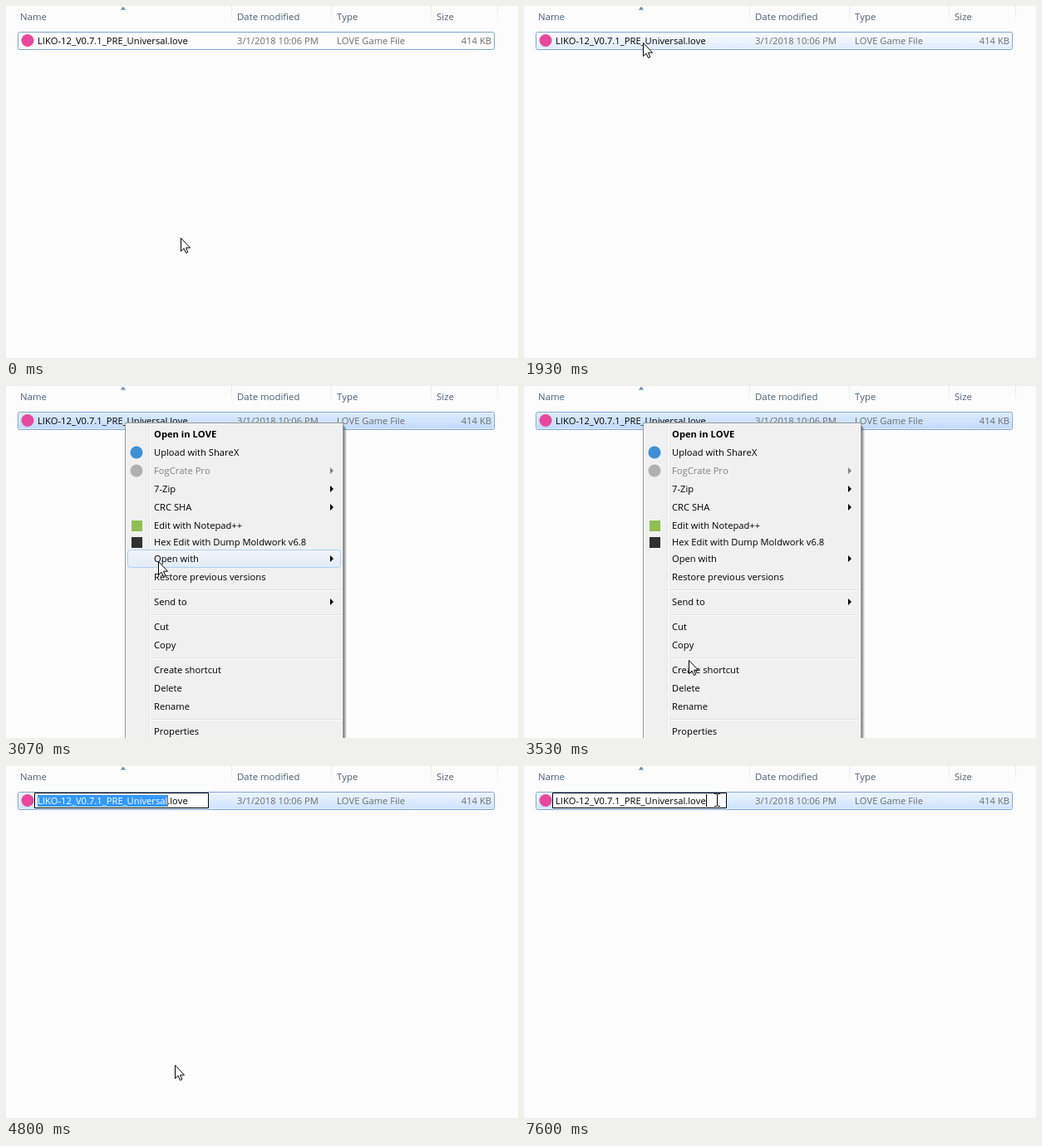
Animation of 616 by 424 pixels, one loop 8000 ms. Source, as an HTML page with a canvas:

```html
<!DOCTYPE html>
<html lang="en">
<head>
<meta charset="utf-8">
<title>Renaming a file</title>
<style>
html, body { margin: 0; width: 100%; height: 100%; overflow: hidden; background: #fcfcfc; }
canvas { display: block; }
</style>
</head>
<body>
<canvas id="stage" width="616" height="424"></canvas>
<script>
const ctx = document.getElementById('stage').getContext('2d');
const LOOP = 8000, FPS = 15;
const FILE = 'LIKO-12_V0.7.1_PRE_Universal.love';
const BG = '#fcfcfc', GREY = '#6d6d6d', HEAD = '#4c607a';

// Steps at which the interface changes state
const HOVER = 25, SELECT = 30, MENU = 37, CLOSE = 67, EDIT = 69, CLICK = 98;
const BLINK = 8;

const linear = u => u;
const smooth = u => u * u * (3 - 2 * u);
const easeIn = u => u ** 1.6;
const easeOut = u => 1 - (1 - u) ** 1.7;

// Pointer path: step, x, y, easing used to get there
const path = [
  [7, 210, 279], [14, 176, 167, smooth], [17, 176, 167, linear],
  [26, 143, 45, smooth], [27, 143, 45, linear], [28, 143, 44, linear],
  [39, 143, 44, linear], [46, 183, 211, easeIn], [49, 193, 280, linear],
  [62, 203, 388, easeOut], [66, 203, 388, linear], [72, 203, 360, easeIn],
  [79, 193, 185, linear], [89, 220, 42, easeOut], [90, 220, 42, linear],
  [93, 219, 42, linear], [94, 222, 41, linear], [104, 222, 41, linear],
  [106, 232, 41, linear]
];

// Menu rows: label, centre y, options
const menu = [
  ['Open in LOVE', 58, { bold: true }],
  ['Upload with ShareX', 80, { dot: '#3d8fd6' }],
  ['FogCrate Pro', 102, { dot: '#b0b0b0', off: true, sub: true }],
  ['7-Zip', 124, { sub: true }],
  ['CRC SHA', 146, { sub: true }],
  ['Edit with Notepad++', 168, { box: '#8fbf52' }],
  ['Hex Edit with Dump Moldwork v6.8', 188, { box: '#303030' }],
  ['Open with', 208, { sub: true }],
  ['Restore previous versions', 230, {}],
  ['Send to', 260, { sub: true }],
  ['Cut', 290, {}],
  ['Copy', 312, {}],
  ['Create shortcut', 342, {}],
  ['Delete', 364, {}],
  ['Rename', 386, {}],
  ['Properties', 416, {}]
];

function pointerAt(step) {
  let a = path[0];
  if (step <= a[0]) return { x: a[1], y: a[2] };
  for (const b of path) {
    if (step <= b[0]) {
      const u = b[3]((step - a[0]) / (b[0] - a[0]));
      return {
        x: Math.round(a[1] + (b[1] - a[1]) * u),
        y: Math.round(a[2] + (b[2] - a[2]) * u)
      };
    }
    a = b;
  }
  return { x: a[1], y: a[2] };
}

function rect(x, y, w, h, fill) {
  ctx.fillStyle = fill;
  ctx.fillRect(x, y, w, h);
}

function text(str, x, y, color, { weight = 400, align = 'left', size = 11.2 } = {}) {
  ctx.font = `${weight} ${size}px "Open Sans", "Noto Sans", sans-serif`;
  ctx.fontKerning = 'none';
  ctx.textAlign = align;
  ctx.fillStyle = color;
  ctx.fillText(str, x, y);
}

function shape(points, fill, stroke) {
  ctx.beginPath();
  for (const [x, y] of points) ctx.lineTo(x, y);
  ctx.closePath();
  ctx.fillStyle = fill;
  ctx.fill();
  if (stroke) {
    ctx.lineWidth = 1;
    ctx.strokeStyle = stroke;
    ctx.stroke();
  }
}

function disc(x, y, r, fill) {
  ctx.beginPath();
  ctx.arc(x, y, r, 0, Math.PI * 2);
  ctx.fillStyle = fill;
  ctx.fill();
}

function gradient(y0, y1, from, to) {
  const g = ctx.createLinearGradient(0, y0, 0, y1);
  g.addColorStop(0, from);
  g.addColorStop(1, to);
  return g;
}

function panel(x, y, w, h, r, fill, stroke) {
  ctx.beginPath();
  ctx.roundRect(x + 0.5, y + 0.5, w - 1, h - 1, r);
  ctx.lineWidth = 1;
  if (fill) { ctx.fillStyle = fill; ctx.fill(); }
  ctx.strokeStyle = stroke;
  ctx.stroke();
}

function drawHeader() {
  const line = gradient(0, 19, '#dfe5ee', '#f6f8fa');
  for (const x of [271, 391, 511, 591]) rect(x, 0, 1, 19, line);
  const titles = [['Name', 17], ['Date modified', 278], ['Type', 398], ['Size', 518]];
  for (const [label, x] of titles) text(label, x, 17, HEAD, { size: 11.4 });
  shape([[137.5, 5], [141, 1], [144.5, 5]], gradient(1, 5, '#2f4a69', '#9fc3e0'));
}

function rowFill(step) {
  if (step < HOVER) return null;
  if (step < SELECT) return gradient(32, 52, '#f9fbff', step === HOVER ? '#ecf4fd' : '#dfebfb');
  if (step < CLOSE + 1) return gradient(32, 52, '#dcebfd', '#c1dbfc');
  return gradient(32, 52, '#ebf4fe', '#cfe3fe');
}

function drawRow(step) {
  const fill = rowFill(step);
  panel(14, 31, 574, 22, 2, fill, '#7fa5d2');
  if (fill) panel(15, 32, 572, 20, 1, null, 'rgba(255,255,255,.45)');
  disc(26, 41.5, 7.5, '#e8489c');
  text('3/1/2018 10:06 PM', 278, 46, GREY);
  text('LOVE Game File', 398, 46, GREY);
  text('414 KB', 584, 46, GREY, { align: 'right' });
  if (step < EDIT) text(FILE, 38, 46, '#000');
  else drawEditor(step);
}

function drawEditor(step) {
  panel(34, 32, 210, 19, 0, '#fff', '#000');
  text(FILE, 38, 46, '#000');
  const selecting = step < CLICK;
  if (selecting) {
    ctx.save();
    ctx.beginPath();
    ctx.rect(38, 35, 157, 14);
    ctx.clip();
    rect(38, 35, 157, 14, '#3399ff');
    text(FILE, 38, 46, '#fff');
    ctx.restore();
  }
  const since = step - (selecting ? EDIT : CLICK);
  if (Math.floor(since / BLINK) % 2 === 0) {
    if (selecting) rect(194, 35, 1, 14, '#c46a10');
    else rect(219, 34, 1, 15, '#000');
  }
}

function drawItem([label, y, o], hot) {
  if (hot) {
    const glow = gradient(y - 11, y + 11, 'rgba(242,246,252,.6)', 'rgba(222,233,249,.7)');
    panel(146, y - 11, 257, 22, 3, glow, '#aecff7');
  }
  if (o.dot) disc(157, y, 7.5, o.dot);
  if (o.box) rect(151, y - 6, 13, 13, o.box);
  const ink = o.off ? '#808080' : '#000';
  text(label, 178, y + 4, ink, { weight: o.bold ? 700 : 400 });
  if (o.sub) shape([[390, y - 4], [394, y], [390, y + 4]], ink);
}

function drawMenu(step, pointer) {
  if (step < MENU || step >= CLOSE) return;
  ctx.save();
  ctx.globalAlpha = Math.min(1, (step - MENU + 1) / 3);
  for (let i = 0; i < 4; i++) rect(406 + i, 48 + i, 1, 376, `rgba(0,0,0,${0.44 - i * 0.12})`);
  panel(143, 44, 263, 400, 0, '#f0f0f0', '#979797');
  panel(144, 45, 261, 398, 0, null, '#f6f6f6');
  rect(172, 46, 1, 378, '#e2e3e3');
  rect(173, 46, 1, 378, '#fff');
  for (const y of [245, 275, 327, 401]) {
    rect(174, y, 229, 1, '#e0e0e0');
    rect(174, y + 1, 229, 1, '#fff');
  }
  for (const item of menu) {
    const hot = pointer.x > 145 && Math.abs(pointer.y - item[1]) < 11;
    drawItem(item, hot);
  }
  ctx.restore();
}

function drawArrow(x, y) {
  const outline = [[0, 0], [0, 16], [3.6, 12.6], [6, 18], [8.3, 17], [6, 11.7], [11, 11.7]];
  shape(outline.map(([dx, dy]) => [x + 0.5 + dx, y + 0.5 + dy]), '#fff', '#000');
}

function drawBeam(x, y) {
  for (const dy of [-8, 7]) {
    rect(x - 3, y + dy, 3, 1, '#000');
    rect(x + 1, y + dy, 3, 1, '#000');
  }
  rect(x, y - 7, 1, 14, '#000');
}

function render(ms) {
  // The screen refreshes in fixed steps, rounded to 10 ms
  const step = Math.floor((ms + 5) * FPS / 1000) % (LOOP * FPS / 1000);
  const p = pointerAt(step);
  rect(0, 0, 616, 424, BG);
  drawHeader();
  drawRow(step);
  drawMenu(step, p);
  if (step >= EDIT && p.y < 52) drawBeam(p.x, p.y);
  else drawArrow(p.x, p.y);
}

const start = performance.now();
function tick() {
  render((performance.now() - start) % LOOP);
  requestAnimationFrame(tick);
}
tick();
</script>
</body>
</html>
```
